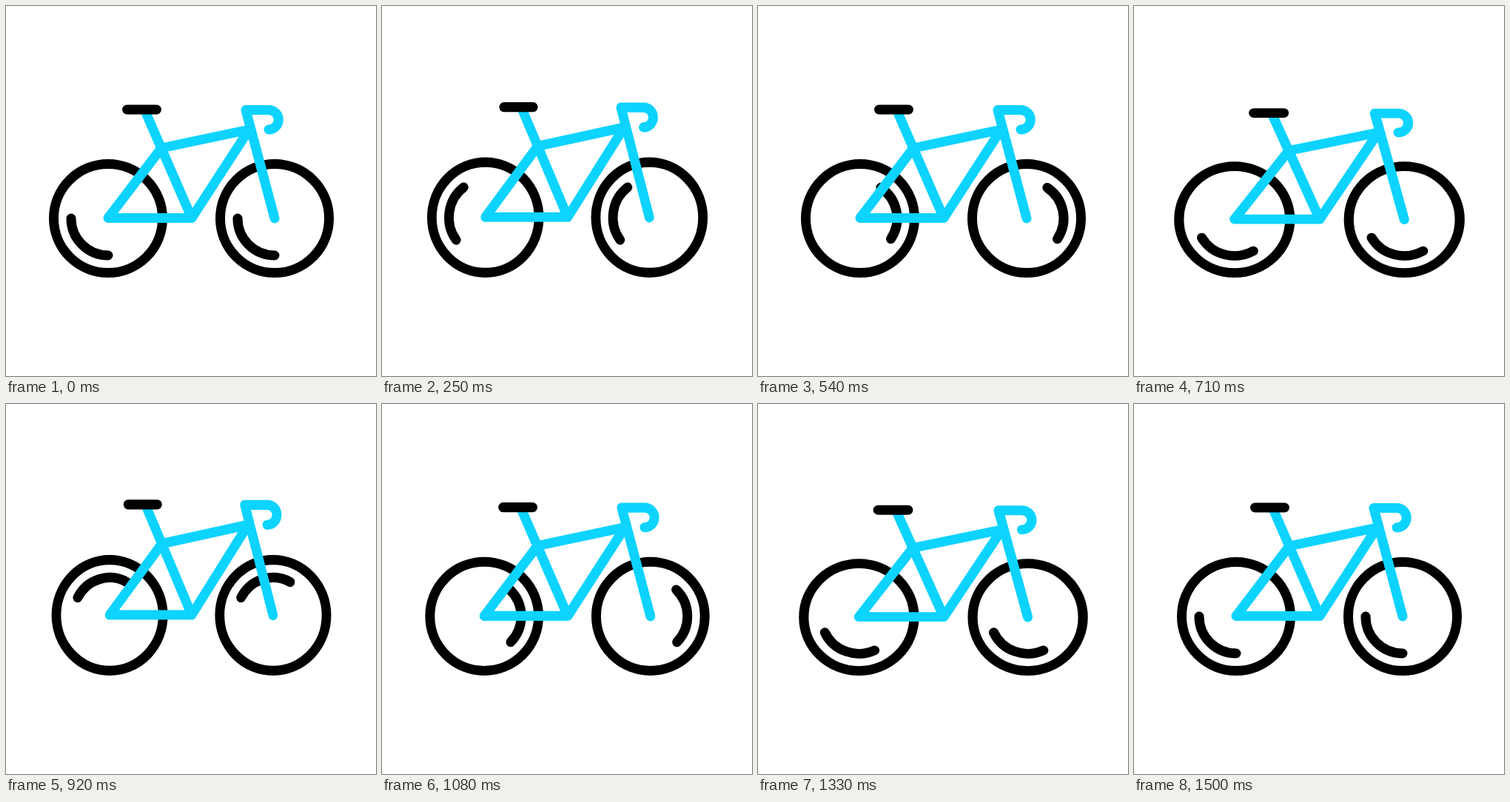
Recreate the animation shown at these times as an HTML page without scripts. Size 500x500 px, loop 1.54 s.

```html
<!DOCTYPE html>
<html lang="en">
<head>
<meta charset="utf-8">
<title>Bicycle</title>
<style>
  @property --f {
    syntax: "<number>";
    inherits: true;
    initial-value: 0;
  }

  html, body {
    margin: 0;
    height: 100%;
    overflow: hidden;
    background: #fff;
  }

  /* --f is a clock that ticks at 24 steps per second */
  svg {
    display: block;
    width: 100%;
    height: 100%;
    fill: none;
    stroke: #000;
    stroke-width: 13;
    stroke-linecap: round;
    stroke-linejoin: round;
    animation: clock 1540ms steps(37) -5ms infinite;
  }

  @keyframes clock {
    from { --f: 0; }
    to { --f: 37; }
  }

  /* Two turns, eased with a smoothstep */
  .shine {
    --x: calc(var(--f) / 36);
    transform: rotate(calc(var(--x) * var(--x) * (3 - 2 * var(--x)) * 720deg));
  }

  /* Stretch and squash: one smoothstep per swing, summed */
  .bike {
    --a: clamp(0, var(--f) / 8.8, 1);
    --b: clamp(0, (var(--f) - 8.8) / 8.4, 1);
    --c: clamp(0, (var(--f) - 17.2) / 5.4, 1);
    --d: clamp(0, (var(--f) - 22.6) / 7.2, 1);
    --e: clamp(0, (var(--f) - 29.8) / 6.2, 1);
    --stretch: calc(0.02 * (
      var(--a) * var(--a) * (3 - 2 * var(--a))
      - 2 * var(--b) * var(--b) * (3 - 2 * var(--b))
      + 2 * var(--c) * var(--c) * (3 - 2 * var(--c))
      - 2 * var(--d) * var(--d) * (3 - 2 * var(--d))
      + var(--e) * var(--e) * (3 - 2 * var(--e))));
    transform-origin: 250.5px 367px;
    transform: scale(calc(1 - var(--stretch)), calc(1 + var(--stretch)));
  }

  .frame { stroke: #0dd3ff; }
</style>
</head>
<body>
<svg viewBox="0 0 500 500">
  <defs>
    <g id="wheel">
      <circle r="73.5"/>
      <path class="shine" d="M-50 0A50 50 0 0 0 0 50"/>
    </g>
  </defs>
  <g class="bike">
    <use href="#wheel" x="138" y="287"/>
    <use href="#wheel" x="363" y="287"/>
    <g class="frame">
      <path d="M188 142L251 286.500H138L210 192L328.500 167L251 286.500"/>
      <path d="M363 287L324 140.500H355a13 13 0 0 1 0 26.500"/>
    </g>
    <path d="M163.500 140H203.500"/>
  </g>
</svg>
</body>
</html>
```
